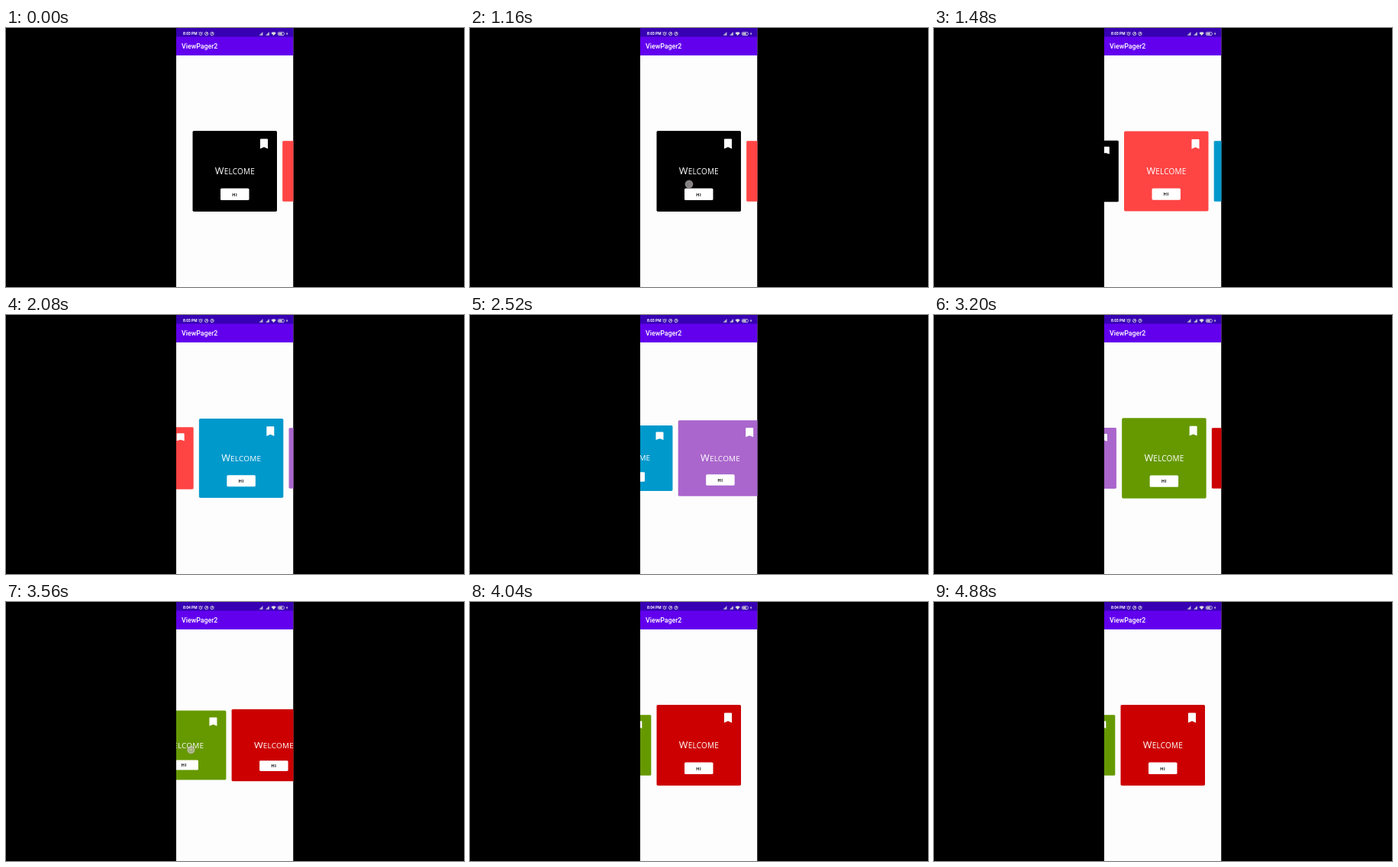
Recreate the animation shown at these times as an HTML page. Size 600x340 px, loop 7.64 s.

```html
<!DOCTYPE html>
<html>
<head>
<meta charset="utf-8">
<style>
  html, body { margin: 0; width: 100%; height: 100%; overflow: hidden; background: #000; }
  svg { display: block; width: 600px; height: 340px; }
  text { font-family: Roboto, sans-serif; fill: #fff; }
  .title { font-size: 8.8px; font-weight: 500; }
  .clock { font-size: 4.9px; font-weight: 600; }
  .welcome { font: 12.6px "Open Sans", "Noto Sans", sans-serif; letter-spacing: .2px; text-anchor: middle; }
  .welcome tspan { font-size: 10px; }
  .hi { font-size: 5.8px; font-weight: 700; letter-spacing: .7px; text-anchor: middle; fill: #111; }
</style>
</head>
<body>
<svg viewBox="0 0 600 340">
  <clipPath id="screen"><rect x="223" width="153.5" height="340"/></clipPath>
  <g clip-path="url(#screen)">
    <rect x="223" width="153.5" height="340" fill="#fdfdfd"/>
    <rect x="223" width="153.5" height="36" fill="#6200ee"/>
    <rect x="223" width="153.5" height="11.5" fill="#3700b3"/>
    <text class="title" x="230" y="27">ViewPager2</text>
    <text class="clock" id="clock" x="232" y="9.3"></text>
    <g fill="none" stroke="#ddd" stroke-width=".8">
      <circle cx="255" cy="7.5" r="2"/>
      <path d="M253 5l-.7.7M257 5l.7.7M255 6.4v1.2h.8"/>
      <circle cx="262.6" cy="7.5" r="2.2"/>
      <path d="M261.5 8.4l2-1.8M262.3 6.6h1.3v1.2"/>
      <circle cx="270" cy="7.5" r="2.2"/>
      <path d="M268.9 8.4l2-1.8M269.7 6.6h1.3v1.2"/>
      <rect x="356.3" y="5.6" width="8" height="3.9" rx="1.2"/>
    </g>
    <g fill="#ddd">
      <path d="M331.5 9.7h5v-4.6zM340 9.7h5v-4.6z" opacity=".8"/>
      <path d="M347.4 6.6q3.2-2.6 6.4 0l-3.2 3.5z"/>
      <rect x="357.2" y="6.5" width="4.6" height="2.1"/>
      <path d="M368.6 5l-1.8 2.8h1.2l-.5 2.2 1.9-2.9h-1.2z"/>
    </g>
    <g id="cards"></g>
    <g id="touch">
      <circle r="5.2" fill="#e4dde2" fill-opacity=".6" stroke="#777" stroke-opacity=".45" stroke-width=".8"/>
      <circle r="2.6" fill="none" stroke="#777" stroke-opacity=".6" stroke-width=".9"/>
    </g>
  </g>
</svg>
<script>
const LOOP = 7640, STEP = 117.7, LEFT = 244.5, MID = 188, SETTLE = 280;
const COLORS = ['#000', '#f44', '#09c', '#a6c', '#690', '#c00'];
// one entry per swipe: start, drag time, share of a page dragged, finger x and y
const SWIPES = [
  [1160, 160, .5, 289, 205],
  [1760, 187, .5, 292, 200],
  [2270, 190, .5, 294, 197],
  [2806, 200, .5, 294, 194],
  [3360, 215, .626, 311, 194]
];
const $ = id => document.getElementById(id);

$('cards').innerHTML = COLORS.map(color => `<g>
  <rect y="-53" width="110.5" height="106" rx="1.8" fill="${color}"/>
  <path d="M88.5-29.5v-12q0-1 1-1h8q1 0 1 1v12l-5-2.2z" fill="#fff"/>
  <text class="welcome" x="55.4" y="4.3">W<tspan>ELCOME</tspan></text>
  <rect x="36.5" y="22.6" width="37.5" height="15.4" rx="1.6" fill="#fff"/>
  <text class="hi" x="55.4" y="32.6">HI</text></g>`).join('');
const cards = [...$('cards').children];

function swipe(t, drag, reach) {
  if (t <= 0) return 0;
  if (t < drag) return reach * (t / drag) ** 1.5;
  return 1 - (1 - reach) * Math.max(0, 1 - (t - drag) / SETTLE) ** 3;
}

function draw(time) {
  let scroll = 0, finger = null;
  for (const [start, drag, reach, x, y] of SWIPES) {
    const t = time - start, moved = swipe(t, drag, reach);
    scroll += moved;
    if (t >= 0 && t <= drag) finger = [x - moved * STEP - (moved ? 2 : 0), y];
  }
  cards.forEach((card, i) => {
    const pos = i - scroll;
    const scale = 1 - .25 * Math.min(1, Math.abs(pos));
    card.setAttribute('transform', `translate(${LEFT + pos * STEP} ${MID}) scale(1 ${scale})`);
  });
  $('touch').style.display = finger ? '' : 'none';
  if (finger) $('touch').setAttribute('transform', `translate(${finger})`);
  $('clock').textContent = time < 3360 ? '8:03 PM' : '8:04 PM';
}

const begin = performance.now();
function tick() {
  draw((performance.now() - begin) % LOOP);
  requestAnimationFrame(tick);
}
tick();
</script>
</body>
</html>
```
